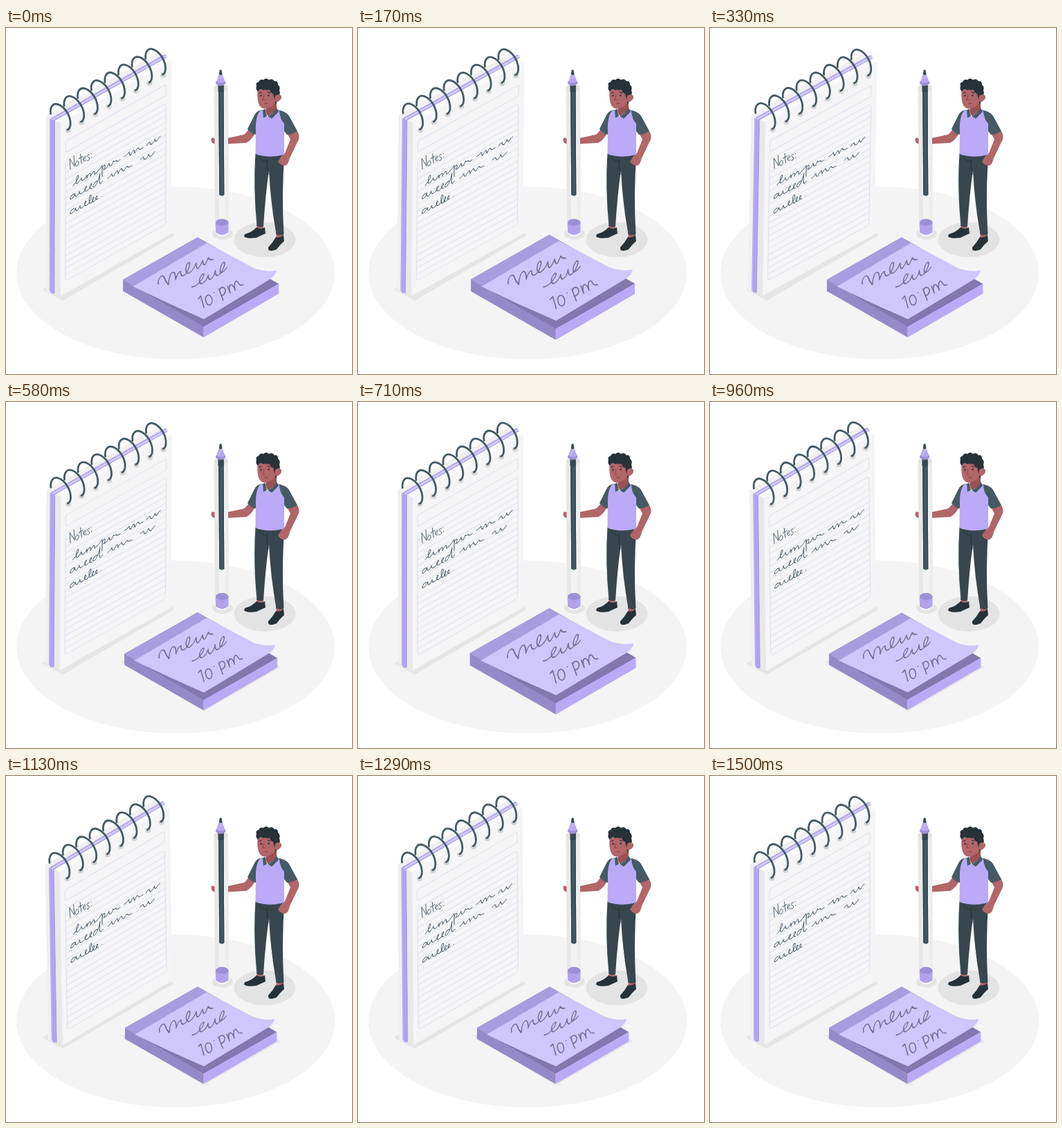
An HTML page that plays this animation: 500x500 px, repeating every 1.54 s.

```html
<!DOCTYPE html>
<html lang="en">
<head>
<meta charset="utf-8">
<title>Notes</title>
<style>
  html, body { margin: 0; width: 100%; height: 100%; overflow: hidden; background: #fff; }
  svg { display: block; width: 100%; height: 100%; }
  .ink { fill: none; stroke: #455a64; stroke-width: .95; stroke-linecap: round; stroke-linejoin: round; }
  .memo { stroke: #746d91; stroke-width: 1.5; }
  .rule { fill: none; stroke: #dfdaf4; stroke-width: .9; }
  .ring { fill: none; stroke: #455a64; stroke-width: 2.8; stroke-linecap: round; }
  .skin { fill: #b16668; }
  .sleeve { fill: #455a64; }
  .dark { fill: #263238; }
</style>
</head>
<body>
<svg viewBox="0 0 500 500">
  <ellipse cx="245" cy="354" rx="230" ry="125" fill="#f4f4f4"/>
  <path d="M52 378L82 394L243 300Q243 297 238 296L79 368L62 372Z" fill="#e5e5e5"/>

  <g id="pad">
    <path d="M58 127L218 36L228 40V290L64 383L58 380Z" fill="#f0f0f0"/>
    <path d="M63 131L71 135V383L66 384L63 380Z" fill="#baaaf5"/>
    <path d="M64 131L227 38Q232 37 232 41V44L71 135Z" fill="#d3caf9"/>
    <path d="M66.500 132V383M69.500 134V384M65 131.500L230 38.500M69 134L232 42" fill="none" stroke="#a799e4" stroke-width="1.200"/>
    <path d="M71 134L231 43L239 47L79 138Z" fill="#fafafa"/>
    <path d="M71 134L79 138V388L71 384Z" fill="#e8e8e8"/>
    <path d="M79 138L239 47V295Q239 297 237 298L79 388Z" fill="#f5f5f5"/>
    <g id="rules" transform="matrix(1 -.57 0 1 79 137)"></g>
    <g id="rings"></g>
    <g class="ink">
      <path d="M93 204L92 189L99 200L98 185M102 193c-3 3 -2 8 1 6c4 -3 2 -9 -1 -6M107.500 182L109 195.500M105 189L111 185.500M112 190.500c5 -3 3 -7 1 -4c-3 5 0 8 3 4M120.500 183c-4 0 -4 4 -1 4c2 1 1 5 -2 5M123 181.500v.3M123.500 187v.3"/>
      <path transform="matrix(1 -.53 0 1 97 228)" d="M0 0C5 -2 10 -10 7 -11C5 -11 3 0 6 0Q9 0 12 -5Q12 0 15 0Q18 -1 20 -5L20 0Q22 -5 24 -5Q26 -4 25 0Q28 -5 30 -5Q31 -3 31 0Q36 -1 42 -7L42 9Q41 -5 45 -6Q48 -4 44 0Q49 1 52 -5Q52 0 55 0Q57 -1 58 -5Q60 -2 62 -4Q63 0 68 -2M74 -3Q78 -3 81 -6Q81 -2 83 0Q86 -6 88 -5L89 0Q92 -6 94 -5Q95 0 101 -2M106 -2Q110 -6 111 -4Q111 0 114 0Q117 -2 118 -5Q119 0 121 -1Q122 -4 126 -5"/>
      <path transform="matrix(1 -.53 0 1 93 247)" d="M6 -4C2 -6 -2 0 1 1Q5 1 7 -4Q6 0 9 1Q12 0 13 -4Q13 1 16 1C22 0 25 -6 23 -6C20 -5 20 1 24 1C30 0 32 -6 30 -6C27 -5 27 1 31 1M39 -5C34 -6 31 0 34 1Q39 1 43 -14Q41 1 44 1L47 -1M54 -1Q58 -2 60 -5Q60 0 63 0Q66 -5 68 -5L69 0Q72 -5 74 -5Q75 0 78 0Q81 -4 82 -4Q83 0 89 -1M101 -3Q105 -6 106 -4Q106 0 109 0Q112 -2 113 -5Q114 0 116 0Q119 -2 122 -4"/>
      <path transform="matrix(1 -.53 0 1 93 268)" d="M6 -4C2 -6 -2 0 1 1Q5 1 8 -4Q7 0 10 1Q13 0 14 -4Q14 1 17 1C22 0 24 -6 22 -6C20 -5 20 1 24 1C29 -1 32 -11 29 -11C27 -10 26 1 30 1C34 0 35 -6 33 -6C31 -5 31 1 34 1C39 0 40 -5 38 -5C36 -4 36 1 40 0M45 -1v.2"/>
    </g>
  </g>

  <ellipse cx="313" cy="297.500" rx="15" ry="8.500" fill="#e4e4e4"/>
  <g id="pen">
    <path d="M300.500 86L321 86L322.500 296Q312 306 302 296Z" fill="#f2f2f2"/>
    <path d="M300.500 86H306L308 276L302 290Z" fill="#e8e8e8"/>
    <path d="M316 88H321L322 277H318Z" fill="#ededed"/>
    <ellipse cx="310.700" cy="86" rx="10.300" ry="5.500" fill="#e3e3e3"/>
    <path d="M307 83H314.500L315.300 241Q312 244.500 308.300 241Z" fill="#455a64"/>
    <path d="M307 83H309L310.300 242L308.300 241ZM313 83H314.500L315.300 241L313.500 242Z" fill="#37474f"/>
    <path d="M306.500 82H314.500V92Q310 94 306.500 92Z" fill="#37474f"/>
    <path d="M307.500 67Q310 69 312.500 67L317.500 80Q310 87 303 80Z" fill="#baaaf6"/>
    <path d="M303.500 77Q310 82 316.700 77L317.500 80Q310 87 303 80Z" fill="#9d8fd6"/>
    <path d="M308.700 61Q310 59.500 311.500 61L312.500 67Q310 69 307.800 67Z" fill="#37474f"/>
    <path d="M302 292Q312 308 322.500 292" fill="none" stroke="#fff" stroke-width="1.500"/>
    <path d="M303 281H321.500V295Q312 303 303 295Z" fill="#b2a3eb"/>
    <ellipse cx="312.200" cy="281" rx="9.300" ry="5" fill="#9d8fd6"/>
  </g>

  <g id="person">
    <ellipse cx="374" cy="306" rx="44.500" ry="25.500" fill="#e3e3e3"/>
    <path class="skin" d="M362 284H372V293H363ZM390 295H401V304H391Z"/>
    <path class="dark" d="M345 298Q356 295 362 288Q368 292 374 288L375 297Q368 300 362 303Q347 305 344 301ZM379 317Q385 311 390 302Q396 304 401 299L402 308Q397 312 391 320Q381 324 379 320Z"/>
    <path d="M360.500 181H402.500Q398 240 401.500 298Q396 301 390.500 298Q382 250 380 206Q375 240 372 286Q367 289 362.500 286Q357 230 360.500 181Z" fill="#37474f"/>
    <path d="M378 190Q376 200 379 212M365 186Q370 193 378 193" fill="none" stroke="#263238" stroke-width="1"/>
    <path class="skin" d="M351 145Q350 149 344 154L321 159V167.500L347 166Q354 163 360 152ZM301.500 160Q300 158 298 158.500Q295.500 160 297 164Q298 167 301.500 167.500ZM420 148Q425 154 423 161L410 188Q408 198 403 199Q397 199 393 193L398 185L403 181L411 161L406 152Z"/>
    <path class="sleeve" d="M371 118Q362 119 359 126L349 146Q354 153 361 154L368 130ZM390 118Q405 120 409 127L421 149Q414 154 406 154L397 143Z"/>
    <path d="M369 118Q374 126 378 128Q387 126 392 118L395 120Q396 132 402 138V183Q380 189 360.500 182L361 149Q360 125 369 118Z" fill="#baaaf7"/>
    <path d="M377 108L391 105V120Q384 125 378 127L375 120Z" fill="#995256"/>
    <path class="sleeve" d="M374 116L377 127L372 130L371 119ZM391 115L394 121L384 131L378 127Q388 124 391 115Z"/>
    <path class="skin" d="M364 88Q362 98 365 109Q368 118 377 116Q388 114 391 103L390 86Q376 81 364 88Z"/>
    <path class="dark" d="M364 92Q360 88 362 84Q360 79 365 78Q367 73 372 75Q376 71 380 75Q385 72 388 77Q393 76 393 82Q397 85 395 90Q397 95 394 100L390 111L388 103L386 95Q382 94 381 89Q378 91 375 89Q371 91 369 88Q366 88 364 92Z"/>
    <path class="skin" d="M389 98Q394 94 398 98Q399 104 392 107L388 106Z"/>
    <path d="M366 94.500L369 93M378 92.500L382 94" stroke="#263238" stroke-width="1.100" stroke-linecap="round"/>
    <path d="M373 97L371 104L374 104M374 109.500Q376 108.500 378 109.500" fill="none" stroke="#7d3b42" stroke-width=".9"/>
    <circle class="dark" cx="368.500" cy="98" r="1.200"/><circle class="dark" cx="379.500" cy="97.500" r="1.200"/>
  </g>

  <path d="M167 376L277 315L397 383L286 447Z" fill="#e6e6e6"/>
  <g id="note">
    <path d="M172 364L277 304.500L391.300 370L285.500 431Z" fill="#8277af"/>
    <path d="M172 364L285.500 430V445L172 380Z" fill="#958ac8"/>
    <path d="M285.500 430L391.300 370V383.500L285.500 445Z" fill="#baaaf6"/>
    <path d="M172 364L277 304.500L291 313L187 373Z" fill="#a89ddf"/>
    <path d="M290 312.500L357 348Q374 354 388 351Q388 359 373 367L286 419.500Q236 398 186 373.500Z" fill="#cfc6fb"/>
    <g class="ink memo">
      <path transform="matrix(1 -.5 0 1 222 374)" d="M0 -4C-2 -12 6 -17 8 -9Q10 -2 14 4C14 -6 18 -12 21 -10Q24 -8 24 2Q27 -7 31 -6Q31 2 36 2C43 0 46 -13 42 -13C37 -12 37 3 44 2Q50 0 53 -7Q53 2 56 2Q60 -1 62 -6Q63 3 66 1Q69 -3 70 -6Q72 -1 77 0"/>
      <path transform="matrix(1 -.55 0 1 269 374)" d="M0 0C6 4 16 -2 17 -8C16 -12 9 -7 11 0C13 6 21 3 23 -4Q23 4 27 4Q32 2 33 -5Q33 4 37 4C44 3 48 -8 45 -10C40 -10 37 4 43 3Q46 3 49 0"/>
      <path d="M278 391L281.500 387L286 403.500M290.500 386c-5 4 -1 15 4 13.500c6 -3 2 -17 -4 -13.500M300.500 382v.4M307 377L313 393M308 380c0 -6 6 -7 8 -2c1 5 -3 9 -6 8M319 373L323 383c-2 -6 -2 -11 1 -12c3 0 5 5 6 8c-2 -7 -1 -13 2 -13c3 1 3 8 9 5"/>
    </g>
  </g>
</svg>
<script>
  const LOOP = 1540, CYCLE = 1520, LEAD = 40;
  const byId = id => document.getElementById(id);

  let rules = '<rect class="rule" x="7" y="31" width="145" height="16" rx="3"/>' +
              '<rect class="rule" x="7" y="58" width="145" height="175" rx="4"/>';
  for (let i = 1; i < 19; i++) rules += `<path class="rule" d="M7 ${58 + i * 9.21}h145"/>`;
  byId('rules').innerHTML = rules;

  let rings = '';
  for (let i = 0; i < 8; i++) {
    rings += `<g transform="translate(${i * 19.6} ${i * -11.4})">
      <ellipse cx="89.500" cy="148" rx="4" ry="3.500" fill="#d2d2d2"/>
      <path class="ring" d="M64.300 124C63 114 68 108 75 110.500C85 114 93 127 93 138C93 143 91 146 89 147"/></g>`;
  }
  byId('rings').innerHTML = rings;

  // Linear interpolation through [position, value] stops.
  function track(stops, p) {
    const i = Math.max(1, stops.findIndex(s => s[0] >= p));
    const [a, from] = stops[i - 1], [b, to] = stops[i];
    return from + (to - from) * (p - a) / (b - a);
  }
  const sway = [[0, 0], [.25, 1], [.75, -1], [1, 0]];
  const beat = [[0, 1], [.1, 1.1], [.3, 1], [.4, 1], [.5, 1.1], [.6, 1], [1, 1]];

  function draw(now) {
    const p = Math.min(1, (now % LOOP + LEAD) / CYCLE);
    byId('pad').setAttribute('transform', `rotate(${track(sway, p)} 149 208)`);
    byId('note').setAttribute('transform',
      `translate(281.7 374.8) scale(${track(beat, p)}) translate(-281.7 -374.8)`);
  }

  const start = performance.now();
  function tick() {
    draw(performance.now() - start);
    requestAnimationFrame(tick);
  }
  tick();
</script>
</body>
</html>
```
